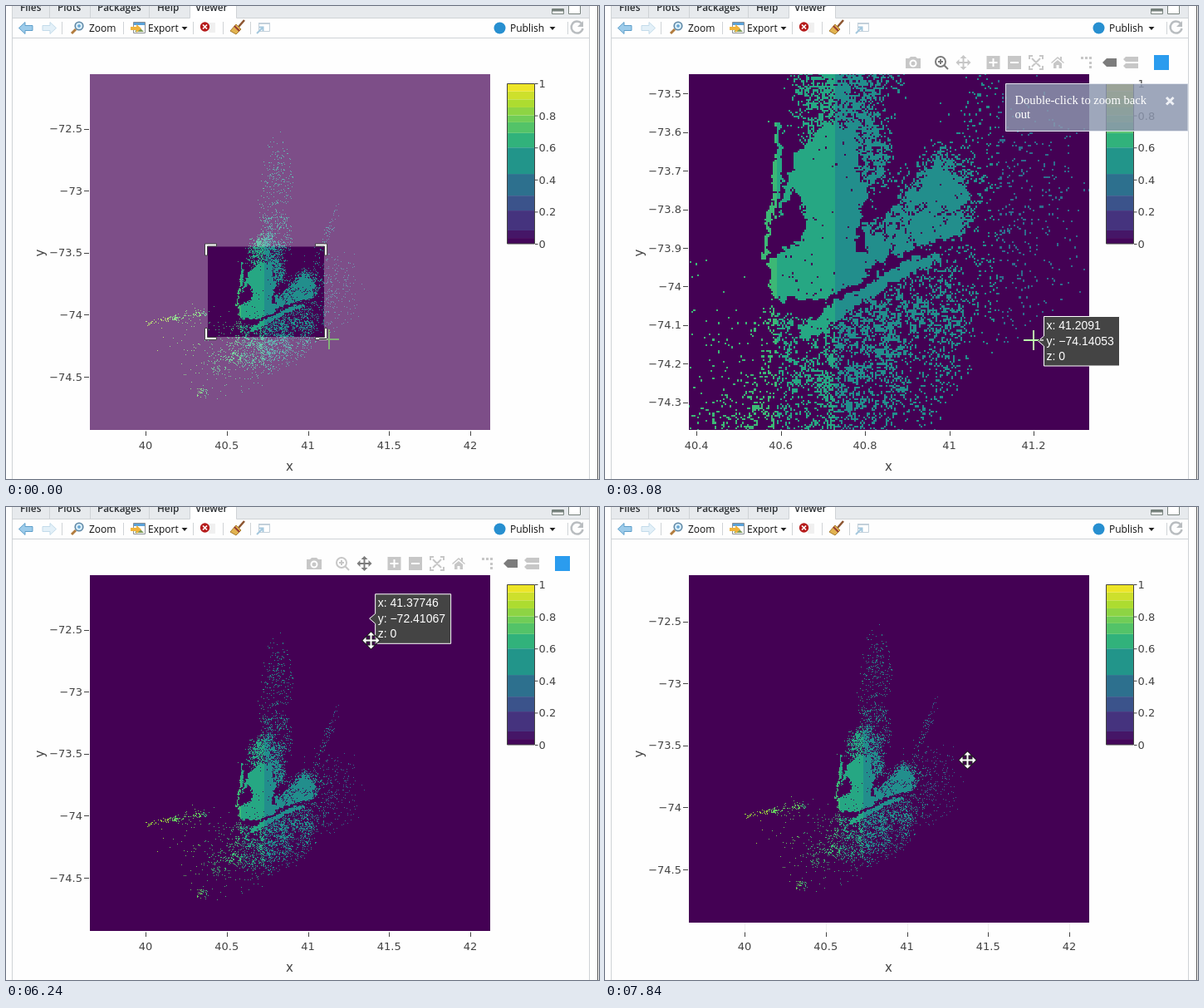
These frames come from a looping animation (714 px wide and 569 px high, 7.99 s). An HTML page with a canvas:

```html
<!DOCTYPE html>
<html lang="en">
<head>
<meta charset="utf-8">
<title>Heatmap viewer</title>
<style>
html, body { margin: 0; width: 100%; height: 100%; overflow: hidden; background: #fefefe; }
canvas, svg { position: absolute; left: 0; top: 0; }
#heat { left: 101px; top: 82px; }
#cross { mix-blend-mode: difference; }
.ui { font: 12px "Open Sans", "Noto Sans", sans-serif; fill: #111; }
.tab { font: 600 11.8px "Open Sans", "Noto Sans", sans-serif; fill: #2b2f33; }
.axis { font: 13px "DejaVu Sans", sans-serif; fill: #444; }
.tip { font: 14px "Liberation Sans", Arial, sans-serif; fill: #fff; }
.note { font: 14.6px "Liberation Serif", Times, serif; fill: #fff; }
.title { font-size: 15px; text-anchor: middle; }
.line { stroke: #444; fill: none; }
.sep { stroke: #cfd3d6; fill: none; }
.icon { fill: #c7c7c7; }
.icon .o { fill: none; stroke: #c7c7c7; stroke-width: 2; }
.icon .w { fill: none; stroke: #fff; stroke-width: 2; }
.icon.on { fill: #7c7c7c; }
.icon.on .o { stroke: #7c7c7c; }
</style>
</head>
<body>
<canvas id="heat" width="482" height="428"></canvas>
<svg id="stage" width="714" height="569" viewBox="0 0 714 569">
  <!-- panel frame and tabs -->
  <path d="M8 0H702V14H8Z" fill="#e7eaed"/>
  <path d="M222 0H277V15H222Z" fill="#fff"/>
  <path class="sep" d="M7.5 0V569M702.5 0V569M8 14.5H221.5V0M277.5 0V14.5H702M8 38.5H702M52.5 0V14M101.5 0V14M172.5 0V14"/>
  <path d="M712.5 0V569" stroke="#555"/>
  <g class="tab">
    <text x="17" y="6">Files</text><text x="62" y="6">Plots</text><text x="110" y="6">Packages</text>
    <text x="182" y="6">Help</text><text x="228" y="6">Viewer</text>
  </g>
  <path d="M657.5 3.5H671.5V9.5H657.5ZM677.5 -1V9.5H691.5V-1" fill="#fff" stroke="#76817c"/>
  <path d="M658 5H671" stroke="#76817c" stroke-width="3"/>
  <!-- toolbar -->
  <path d="M15.5 26.5L23 19.5V23.5H32V29.5H23V33.5Z" fill="#9ccbea" stroke="#5f9fca"/>
  <path d="M60.5 26.5L53 19.5V23.5H44V29.5H53V33.5Z" fill="#e3f0f8" stroke="#c3dbea"/>
  <path class="sep" d="M67.5 19V34M141.5 19V34M225.5 19V34M261.5 19V34M294.5 19V34M676.5 19V34"/>
  <path d="M79 33L84 28" stroke="#b27c3e" stroke-width="3"/>
  <circle cx="88" cy="24" r="4.8" fill="#d5ecf8" stroke="#5e87a5" stroke-width="1.6"/>
  <path d="M86 24H90M88 22V26" stroke="#3f8ac4"/>
  <path d="M153.5 19.5H167.5V32.5H153.5Z" fill="#fff" stroke="#8a8f94"/>
  <path d="M154 20H167V23H154Z" fill="#5aa1d8"/><path d="M155 31L160 25L166 31Z" fill="#7d9c59"/>
  <path d="M150 25H157V22L163 27L157 32V29H150Z" fill="#f0b43c"/>
  <path d="M211.5 25H218.5L215 29ZM654.5 25H661.5L658 29Z" fill="#222"/>
  <path d="M244 20H252V32H244Z" fill="#f0f0f0"/>
  <circle cx="239.5" cy="25" r="5.7" fill="#b51a1a"/>
  <path d="M237 22.5L242 27.5M242 22.5L237 27.5" stroke="#fff" stroke-width="1.7"/>
  <path d="M287 17L280 25" stroke="#8c5530" stroke-width="2.5"/>
  <path d="M277 22L283 28L277 34L270 30Z" fill="#e2b350" stroke="#a77b2d"/>
  <path d="M275 24L281 30" stroke="#963e34" stroke-width="2"/>
  <path d="M304.5 20.5H317.5V30.5H304.5Z" fill="#fff" stroke="#c3d0da"/>
  <path d="M304 21H318" stroke="#c3d0da" stroke-width="2"/>
  <path d="M302 33L309 26M305 25.5H309.5V30" fill="none" stroke="#a5c8de" stroke-width="2"/>
  <circle cx="594.5" cy="26.5" r="7" fill="#278fd0"/>
  <path d="M693 21A7 7 0 1 0 694.5 27" fill="none" stroke="#b9bdc0" stroke-width="2.5"/>
  <path d="M695 18V25H688Z" fill="#b9bdc0"/>
  <g class="ui">
    <text x="100" y="31">Zoom</text><text x="171" y="31">Export</text><text x="607" y="31">Publish</text>
  </g>
  <!-- chart -->
  <g id="legend"></g>
  <g id="ticks"></g>
  <text class="axis title" x="341.5" y="558.5">x</text>
  <text class="axis title" transform="translate(46 297) rotate(-90)">y</text>
  <g id="select">
    <path id="shade" fill="#fff" fill-opacity=".3" fill-rule="evenodd"/>
    <path id="corners" fill="#fff" stroke="#444"/>
  </g>
  <g id="bar">
    <g class="icon" transform="translate(371 68)"><path d="M-9 -5H-5L-3 -7H3L5 -5H9V7H-9Z"/><circle class="w" r="3.5" cy="1"/></g>
    <g class="icon" id="zoomIcon" transform="translate(405 68)"><path class="o" d="M3 3L8 8M-4 -1H2M-1 -4V2"/><circle class="o" cx="-1" cy="-1" r="6"/></g>
    <g class="icon" id="panIcon" transform="translate(431.5 68)"><path class="o" d="M-7 0H7M0 -7V7"/><path d="M-9 0L-5 -4V4ZM9 0L5 -4V4ZM0 -9L-4 -5H4ZM0 9L-4 5H4Z"/></g>
    <g class="icon" transform="translate(467.5 68)"><path d="M-8 -8H8V8H-8Z"/><path class="w" d="M-5 0H5M0 -5V5"/></g>
    <g class="icon" transform="translate(493 68)"><path d="M-8 -8H8V8H-8Z"/><path class="w" d="M-5 0H5"/></g>
    <g class="icon" transform="translate(519 68)"><path class="o" d="M-8 -4V-8H-4M8 -4V-8H4M-8 4V8H-4M8 4V8H4M-5 -5L5 5M5 -5L-5 5"/></g>
    <g class="icon" transform="translate(545 68)"><path d="M-8 0L0 -7L3 -4.5V-7H5V-2.5L8 0L7 1L0 -5L-7 1ZM-5 1L0 -3L5 1V7H1.5V3H-1.5V7H-5Z"/></g>
    <g class="icon" transform="translate(579 68)"><path d="M-6 -7h3v3h-3zM-1 -7h3v3h-3zM4 -7h3v3h-3zM4 -1h3v3h-3zM4 4h3v3h-3z"/></g>
    <g class="icon on" transform="translate(608 68)"><path d="M-9 0L-4 -5H8V5H-4Z"/></g>
    <g class="icon" transform="translate(633 68)"><path d="M-9 -4L-6 -7H9V-1H-6ZM-9 4L-6 1H9V7H-6Z"/></g>
    <path d="M661 59H679V77H661Z" fill="#2b9cee"/>
  </g>
  <g id="tip">
    <path d="M0 0L7 -6V-29.5H98V30H7V6Z" fill="#444" stroke="#fff"/>
    <g class="tip"><text x="10" y="-14"></text><text x="10" y="5"></text><text x="10" y="23"></text></g>
  </g>
  <g id="note">
    <path d="M482.5 93.5H702V150.5H482.5Z" fill="#8c97af" fill-opacity=".84" stroke="#e3e6ee"/>
    <g class="note"><text x="493.5" y="118">Double-click to zoom back</text><text x="493.5" y="135">out</text></g>
    <path d="M676 110L684.5 118.5M684.5 110L676 118.5" stroke="#eef0f5" stroke-width="3"/>
  </g>
  <path id="hand" d="M0 -10L4 -6H1V-1H6V-4L10 0L6 4V1H1V6H4L0 10L-4 6H-1V1H-6V4L-10 0L-6 -4V-1H-1V-6H-4Z" fill="#fff" stroke="#222" stroke-width="2" paint-order="stroke"/>
</svg>
<svg id="cross" width="26" height="26" viewBox="-13 -13 26 26"><path d="M-12 0H12M0 -12V12" stroke="#fff" stroke-width="2"/></svg>

<script>
const $ = id => document.getElementById(id);
const N = 600, LOOP = 7990;
const plot = { x: 101, y: 82, w: 482, h: 428 };
const full = { x0: 39.6573, x1: 42.1227, y0: -72.0611, y1: -74.9288, dx: 0.5, dy: 0.5 };
const near = { x0: 40.382, x1: 41.332, y0: -73.4505, y1: -74.371, dx: 0.2, dy: 0.1 };
const spanX = full.x1 - full.x0, spanY = full.y1 - full.y0;
const clamp = v => Math.min(1, Math.max(0, v));
const ramp = (t, a, b) => clamp((t - a) / (b - a));

/* ---------- colour: a viridis ramp cut into bands ---------- */
const stops = ['440154', '472d7b', '3b528b', '2c728e', '21918c', '28ae80', '5ec962', 'addc30', 'fde725']
  .map(h => [0, 2, 4].map(i => parseInt(h.slice(i, i + 2), 16)));
const viridis = z => {
  const i = Math.min(7, Math.floor(z * 8)), u = z * 8 - i;
  return `rgb(${stops[i].map((c, k) => Math.round(c + (stops[i + 1][k] - c) * u))})`;
};
const makeBands = edges => edges.slice(1).map((hi, i) => ({ lo: edges[i], hi, color: viridis((edges[i] + hi) / 2) }));
const legendBands = makeBands([0, 0.036, 0.083, 0.207, 0.3, 0.435, 0.6, 0.69, 0.757, 0.8, 0.85, 0.9, 0.95, 1]);
const dataBands = makeBands([0, 0.3, 0.41, 0.566, 0.622, 0.72, 0.8, 0.9, 1]);

/* ---------- data: painted density, then seeded points ---------- */
const hash = (a, b, s) => {
  let h = Math.imul(a, 374761393) ^ Math.imul(b, 668265263) ^ Math.imul(s, 974634777);
  h = Math.imul(h ^ (h >>> 13), 1274126177);
  h = Math.imul(h ^ (h >>> 16), 2246822519);
  return ((h ^ (h >>> 15)) >>> 0) / 4294967296;
};
const noise = (x, y, s) => {
  const i = Math.floor(x), j = Math.floor(y), u = x - i, v = y - j;
  const row = r => hash(i, r, s) * (1 - u) + hash(i + 1, r, s) * u;
  return row(j) * (1 - v) + row(j + 1) * v;
};
const layer = () => {
  const c = document.createElement('canvas');
  c.width = c.height = N;
  return c.getContext('2d', { willReadFrequently: true });
};

const den = layer();
// lets shapes be given in stage pixels of either view
function useView(v) {
  const sx = N * (v.x1 - v.x0) / spanX / plot.w, sy = N * (v.y1 - v.y0) / spanY / plot.h;
  den.setTransform(sx, 0, 0, sy,
    N * (v.x0 - full.x0) / spanX - plot.x * sx, N * (v.y0 - full.y0) / spanY - plot.y * sy);
}
function blob(x, y, rx, ry, deg, d) {
  den.save();
  den.translate(x, y);
  den.rotate(deg * Math.PI / 180);
  den.scale(rx, ry);
  const g = den.createRadialGradient(0, 0, 0, 0, 0, 1);
  [d, d * 0.65, 0].forEach((a, i) => g.addColorStop(i / 2, `rgba(0,0,0,${a})`));
  den.fillStyle = g;
  den.fillRect(-1, -1, 2, 2);
  den.restore();
}
function shape(d, { width, alpha = 1, cut } = {}) {
  den.save();
  den.globalAlpha = alpha;
  den.globalCompositeOperation = cut ? 'destination-out' : 'source-over';
  den.lineWidth = width;
  width ? den.stroke(new Path2D(d)) : den.fill(new Path2D(d));
  den.restore();
}

useView(full);
blob(322, 398, 60, 44, -25, 0.46);   // south field
blob(325, 225, 23, 84, 5, 0.13);     // north plume
blob(322, 282, 26, 38, 0, 0.3);
blob(384, 283, 7, 58, 21, 0.17);     // north-east plume
blob(390, 340, 45, 60, 0, 0.08);
blob(358, 374, 42, 34, 0, 0.16);
blob(201, 376, 44, 3.5, -11, 0.5);   // western line
blob(236, 371, 14, 8, 0, 0.22);
blob(235, 466, 10, 9, 0, 0.35);
blob(265, 426, 26, 20, -25, 0.2);
blob(255, 415, 85, 62, 20, 0.025);

useView(near);
blob(280, 108, 66, 90, 0, 0.8);
blob(318, 185, 34, 62, 0, 0.7);
blob(405, 222, 60, 62, 0, 0.6);
blob(305, 385, 105, 42, -30, 0.36);
blob(213, 382, 20, 24, 0, 0.7);
shape('M236 170L262 143L302 148L302 190L318 225L306 240L305 262L340 285L318 322L280 348L214 358L197 338L199 308L228 285L244 262L236 240L225 220L205 256L220 205Z');
shape('M310 262L340 252L372 212L412 176L432 200L436 232L425 250L440 262L430 276L400 281L345 302L310 325Z', { alpha: 0.9 });
shape('M205 140L211 170L208 215L202 240L191 304', { width: 7 });
shape('M238 398Q280 364 325 337T400 298', { width: 20 });
shape('M250 364Q290 350 330 320T475 280', { width: 8, cut: true });
shape('M208 363H252', { width: 17, cut: true });
shape('M308 264V295', { width: 12, cut: true });

const alpha = den.getImageData(0, 0, N, N).data;
const density = (i, j) => {
  const lim = v => Math.min(N - 1, Math.max(0, Math.round(v)));
  return alpha[(lim(j) * N + lim(i)) * 4 + 3] / 255;
};
const grid = layer();
grid.fillStyle = '#440154';
grid.fillRect(0, 0, N, N);
for (let i = 0; i < N; i++) {
  grid.fillStyle = dataBands.find(b => 1 - i / N <= b.hi).color;
  for (let j = 0; j < N; j++) {
    const wob = s => (noise(i / 3, j / 3, s) - 0.5) * 5;
    const d = density(i + wob(1), j + wob(2));
    const clump = noise(i / 6, j / 6, 3) + noise(i / 2.2, j / 2.2, 5) - 1;
    const p = d > 0.95 ? 0.988 : d + 0.75 * clump * Math.min(1, 2.5 * d);
    if (hash(i, j, 4) < p) grid.fillRect(i, j, 1, 1);
  }
}

/* ---------- legend ---------- */
const barY = v => 286 - 193 * v;
$('legend').innerHTML = legendBands.map(b =>
  `<rect x="603.5" y="${barY(b.hi)}" width="33" height="${barY(b.lo) - barY(b.hi)}" fill="${b.color}"/>`).join('') +
  '<path class="line" d="M603.5 93.5H636.5V286H603.5Z"/>' +
  [0, 0.2, 0.4, 0.6, 0.8, 1].map(v =>
    `<path class="line" d="M637 ${barY(v) + 0.5}h3.5"/><text class="axis" x="641.5" y="${barY(v) + 5}">${v}</text>`).join('');

/* ---------- time ---------- */
// [first change, last change, how many]
const bursts = [
  [0, 0, 1], [160, 290, 2], [1100, 1970, 7], [2540, 2680, 2], [3080, 3080, 1], [3360, 3600, 3],
  [3910, 4350, 4], [4620, 5580, 8], [5720, 5960, 3], [6240, 7170, 8], [7290, 7840, 5]
];
const ticks = bursts.flatMap(([a, b, n]) =>
  Array.from({ length: n }, (_, i) => Math.round((a + (b - a) * i / Math.max(1, n - 1)) / 10) * 10));

// pointer path: time, x, y
const path = [
  [0, 389, 401], [290, 428, 427], [1240, 428, 427], [1970, 480, 403], [2680, 517, 403], [3000, 521, 403],
  [3360, 500, 399], [3600, 445.5, 387], [4620, 445.5, 387], [5090, 450, 191], [5170, 458, 157],
  [5580, 435, 74], [5960, 432, 70], [6660, 450, 295], [7040, 450, 281], [7290, 450, 281], [7840, 436, 304]
];
function pointer(t) {
  const k = path.findIndex(p => p[0] > t);
  if (k < 1) return path[k < 0 ? path.length - 1 : 0].slice(1);
  const [a, b] = [path[k - 1], path[k]], u = ramp(t, a[0], b[0]);
  return [a[1] + (b[1] - a[1]) * u, a[2] + (b[2] - a[2]) * u];
}

function stateAt(t) {
  const cur = pointer(t), sel = ramp(t, 0, 290), inside = cur[1] > plot.y;
  const hover = t < 1240 ? [242, 290] : pointer(t - 80);
  return {
    view: t >= 1100 && t < 4620 ? near : full,
    cur, inside,
    pan: t >= 5720,
    sel: t < 1100 && [383 + 45 * sel, 398 + 29 * sel],
    tip: t >= 1100 && t < 6700 && inside && hover[1] > plot.y && hover,
    bar: (t >= 1100) * ramp(t, 600, 1240) - ramp(t, 3780, 4350) + ramp(t, 4620, 5170) - ramp(t, 6650, 7170),
    note: ramp(t, 1240, 1970) - ramp(t, 4350, 4900),
    shift: -13.5 * ramp(t, 6660, 7040) + 3.5 * ramp(t, 7290, 7840)
  };
}

/* ---------- drawing ---------- */
const heat = $('heat').getContext('2d');
const show = (id, on) => { $(id).style.display = on ? '' : 'none'; };
const minus = s => String(s).replace('-', '\u2212');

function range(a, b, step) {
  const out = [];
  for (let k = Math.ceil(a / step - 1e-9); k * step <= b + 1e-9; k++) out.push(+(k * step).toFixed(2));
  return out;
}

function drawChart({ view, shift }) {
  const px = x => plot.x + (x - view.x0) / (view.x1 - view.x0) * plot.w;
  const py = y => plot.y + (y - view.y0) / (view.y1 - view.y0) * plot.h + shift;
  const low = view.y1 + shift * (view.y0 - view.y1) / plot.h;
  const xs = range(view.x0, view.x1, view.dx), ys = range(low, view.y0, view.dy);

  heat.clearRect(0, 0, plot.w, plot.h);
  heat.fillStyle = '#eee';
  xs.forEach(x => heat.fillRect(Math.round(px(x) - plot.x), 0, 1, plot.h));
  ys.forEach(y => heat.fillRect(0, Math.round(py(y) - plot.y), plot.w, 1));
  heat.imageSmoothingEnabled = false;
  const left = px(full.x0), top = py(full.y0);
  heat.drawImage(grid.canvas, left - plot.x, top - plot.y, px(full.x1) - left, py(full.y1) - top);

  $('ticks').innerHTML =
    xs.map(x => `<path class="line" d="M${Math.round(px(x)) + 0.5} 511.5v5.5"/><text class="axis" x="${px(x)}" y="533" text-anchor="middle">${x}</text>`).join('') +
    ys.map(y => `<path class="line" d="M94 ${Math.round(py(y)) + 0.5}h6"/><text class="axis" x="92" y="${py(y) + 4.5}" text-anchor="end">${minus(y)}</text>`).join('');
}

function drawSelect(sel) {
  show('select', sel);
  if (!sel) return;
  const l = 243, t = 289.5, [r, b] = sel, c = 11;
  const corner = (x, y, sx, sy) =>
    `M${x - 3.5 * sx} ${y + (c - 0.5) * sy}h${3 * sx}v${-c * sy}h${c * sx}v${-3 * sy}h${-(c + 3) * sx}Z`;
  $('shade').setAttribute('d', `M101 82H583V510H101ZM${l} ${t}H${r}V${b}H${l}Z`);
  $('corners').setAttribute('d', corner(l, t, 1, 1) + corner(r, t, -1, 1) + corner(r, b, -1, -1) + corner(l, b, 1, -1));
}

function drawTip(tip, view) {
  show('tip', tip);
  if (!tip) return;
  const [x, y] = tip;
  const snap = (v, base, step) => +(base + Math.round((v - base) / step) * step).toFixed(5);
  const vx = snap(view.x0 + (x - plot.x) / plot.w * (view.x1 - view.x0), 40.65885, 0.00410632);
  const vy = snap(view.y0 + (y - plot.y) / plot.h * (view.y1 - view.y0), -73.89682, 0.00477863);
  const filled = density((vx - full.x0) / spanX * N, (vy - full.y0) / spanY * N) > 0.6;
  const vz = filled ? +(0.5926332 - (vx - 40.65885) / 2.46).toFixed(7) : 0;
  const rows = ['x: ' + vx, 'y: ' + minus(vy), 'z: ' + vz];
  $('tip').setAttribute('transform', `translate(${x + 0.5} ${y})`);
  $('tip').querySelectorAll('text').forEach((n, i) => { n.textContent = rows[i]; });
}

function draw(s) {
  drawChart(s);
  drawSelect(s.sel);
  drawTip(s.tip, s.view);
  $('bar').style.opacity = s.bar;
  $('note').style.opacity = s.note;
  $('zoomIcon').classList.toggle('on', !s.pan);
  $('panIcon').classList.toggle('on', s.pan);
  show('cross', s.inside && !s.pan);
  show('hand', s.inside && s.pan);
  const [x, y] = s.cur.map(Math.round);
  $('cross').style.transform = `translate(${x - 13}px, ${y - 13}px)`;
  $('hand').setAttribute('transform', `translate(${x + 0.5} ${y + 0.5})`);
}

let shown = -1;
const begin = performance.now();
function frame() {
  const t = (performance.now() - begin) % LOOP;
  const tick = ticks.filter(k => k <= t).pop() ?? 0;
  if (tick !== shown) draw(stateAt(shown = tick));
  requestAnimationFrame(frame);
}
frame();
</script>
</body>
</html>
```
